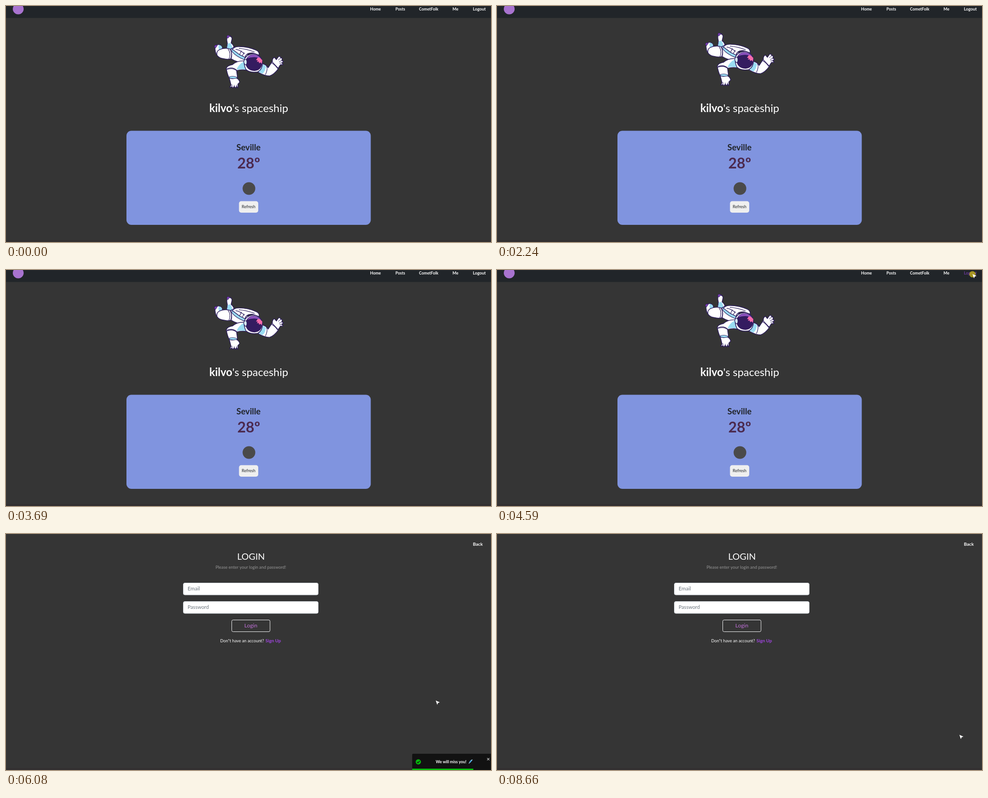
Write an HTML page with a canvas that moves like this. It is 1071 px wide and 523 px high and loops after 8.79 s.

```html
<!DOCTYPE html>
<html lang="en">
<head>
<meta charset="utf-8">
<title>Spaceship</title>
<style>
  html, body { margin: 0; width: 100%; height: 100%; overflow: hidden; background: #353535; }
  canvas { display: block; }
</style>
</head>
<body>
<canvas id="stage" width="1071" height="523"></canvas>
<script>
const ctx = document.getElementById('stage').getContext('2d');
const LOOP = 8790, LOGOUT = 4650;
const INK = '#2a1a5c', WHITE = '#fff', SKY = '#9adcf2', PURPLE = '#7a3fb0', GREEN = '#07bc0c';

function text(str, x, y, size, color = WHITE, weight = 400, align = 'left') {
  ctx.font = `${weight} ${size}px Lato, "Open Sans", sans-serif`;
  ctx.textAlign = align;
  ctx.fillStyle = color;
  ctx.fillText(str, x, y);
  return ctx.measureText(str).width;
}

function rect(x, y, w, h, color) {
  ctx.fillStyle = color;
  ctx.fillRect(x, y, w, h);
}

function box(x, y, w, h, r, fill, stroke) {
  ctx.beginPath();
  ctx.roundRect(x, y, w, h, r);
  if (fill) { ctx.fillStyle = fill; ctx.fill(); }
  if (stroke) { ctx.strokeStyle = stroke; ctx.lineWidth = 1; ctx.stroke(); }
}

function disc(x, y, r, color) {
  ctx.beginPath();
  ctx.arc(x, y, r, 0, Math.PI * 2);
  ctx.fillStyle = color;
  ctx.fill();
}

// Astronaut parts, painted back to front: [path, fill, line width]
const astronaut = [
  // raised leg
  ['M487 97L489 83Q487 76 488 70Q490 65 494 67Q499 68 499 73L497 82Q506 89 502 97L494 103Z', WHITE, 1.4],
  ['M487.5 97L489.5 84Q493 81 496 83Q499 87 500 93L494 102Z', SKY],
  ['M488 71Q487 64 491 65L497 67Q492 67 491 71Z', PURPLE, .8],
  // bent leg
  ['M464 106Q460 95 463 88Q468 84 474 87L478 92Q478 96 472 99L467 108Z', WHITE, 1.4],
  ['M470 86.5Q478 87 477 94L471 98Q468 92 470 86.5Z', SKY],
  ['M460 91Q460 85 467 87L463 93Z', PURPLE, .8],
  ['M466 109Q464 101 471 97Q482 92 494 95Q501 104 497 117Q490 119 482 117Q470 116 466 109Z', WHITE, 1.4],
  // torso
  ['M495 96L503 92L534 108L528 127Q510 125 497 117Q501 106 495 96Z', WHITE, 1.4],
  ['M498 94Q506 90 512 96L531 108L526 119Q508 112 499 101Z', SKY, 1.1],
  ['M490 95Q498 105 492 118M495 95Q501 105 496 117', null, 1.1],
  // backpack
  ['M500 96Q504 90 514 90Q535 90 552 98Q560 101 559 109L545 104Q530 103 528 114L516 108Z', WHITE, 1.4],
  ['M507 96Q516 97 527 106M514 94Q530 95 549 102M520 99L516 107M526 103L522 110', null, 1.2],
  // lower arm with hand
  ['M528 122Q512 120 500 130Q485 133 487 141L510 143Q520 140 531 142Z', WHITE, 1.4],
  ['M525 123Q513 130 509 141Q520 139 531 141L528 126Z', SKY],
  ['M493 159L497 175L494 181L499 179L501 182L504 178L507 182L509 178L512 182L512 173L516 169Q515 163 509 160Z', WHITE, 1.4],
  ['M499 174L499 180M504 175L504 180M509 175L509 180', null, 1],
  ['M487 141Q489 152 493 160Q502 163 511 158L509 143Q500 136 487 141Z', WHITE, 1.4],
  ['M493 157Q502 154 510 158L510 160Q502 162 494 160Z', SKY, .9],
  ['M488 139Q501 134 510 143', null, 1.1],
  // outstretched arm with hand
  ['M557 147L566 128Q574 129 579 137L588 123L602 138Q592 152 582 155Q571 155 557 147Z', WHITE, 1.4],
  ['M558 146L566 129Q573 131 574 135Q572 146 566 150Z', SKY],
  ['M575 133Q579 139 573 152M586 126Q594 130 600 139', null, 1.2],
  ['M588 124Q588 115 593 114L597 119L602 112Q607 111 606 115L610 116L609 121L613 123L609 126L612 130L606 130L601 138Z', WHITE, 1.4],
  ['M601 120L606 116M603 124L609 121M604 127L609 126', null, 1],
  // helmet
  ['M526 120Q530 107 547 105.5Q565 109 566.5 126Q566 141 556 146Q540 149 530 141Q525 131 526 120Z', WHITE, 1.5],
  ['M528.5 125Q530 109 547 107.5Q565 110 566 126Q565 142 549 144Q530 143 528.5 125Z', '#341c60'],
  ['M531 117Q538 106.5 549 107.5Q560 110 564 118Q550 110 531 117Z', '#8b50bd', .7],
  ['M552 120L556 114L561 115L566 120L565 128L562 125L559 127L558 123L554 124L556 120Z', '#f66bab'],
  ['M527 118.5Q532 117.5 532 124.5Q532 130.5 528 130.5Q525 126 525 123Z', '#d8f2fb', 1.1],
].map(([d, fill, line]) => ({ path: new Path2D(d), fill, line }));

function drawAstronaut(t) {
  const lift = 5.8 * (1 + Math.cos((t - 1435) / 3000 * Math.PI * 2));
  ctx.save();
  ctx.translate(0, -lift);
  ctx.strokeStyle = INK;
  ctx.lineJoin = 'round';
  for (const { path, fill, line } of astronaut) {
    if (fill) { ctx.fillStyle = fill; ctx.fill(path); }
    if (line) { ctx.lineWidth = line; ctx.stroke(path); }
  }
  ctx.restore();
}

// Pointer stops: [time, x, y]
const trips = [
  [[400, 1042, 523], [650, 980, 410], [930, 880, 296], [970, 865, 281], [1250, 734, 218],
   [1600, 630, 222], [1840, 598, 226], [2240, 572, 226], [2500, 577, 227], [2770, 604, 228],
   [2950, 655, 231], [3300, 850, 110], [3600, 958, 12], [3680, 975, -20]],
  [[4150, 1020, -14], [4350, 1050, 9], [4800, 1050, 9], [5000, 1043, 60], [5200, 1015, 165],
   [5400, 990, 240], [5560, 966, 305], [5690, 957, 324], [6080, 949, 369], [6400, 943, 393],
   [6600, 944, 398], [7000, 975, 426], [7500, 1021, 445], [LOOP, 1021, 445]],
];

function pointerAt(t) {
  const stops = trips.find(s => t >= s[0][0] && t < s[s.length - 1][0]);
  if (!stops) return null;
  const i = stops.findIndex(s => s[0] > t);
  const [t0, x0, y0] = stops[i - 1], [t1, x1, y1] = stops[i];
  const p = (t - t0) / (t1 - t0);
  return { x: x0 + (x1 - x0) * p, y: y0 + (y1 - y0) * p };
}

const arrow = new Path2D('M0 0L9 4L5 5.5L3.3 9.5Z');
const caret = new Path2D('M-1.5 -6.5H1.5M0 -6.5V5.5M-1.5 5.5H1.5');

function drawPointer({ x, y }, overText) {
  ctx.save();
  ctx.translate(x, y);
  if (overText) {
    ctx.strokeStyle = '#ddd';
    ctx.lineWidth = 1;
    ctx.stroke(caret);
  } else {
    ctx.fillStyle = WHITE;
    ctx.fill(arrow);
  }
  ctx.restore();
}

function drawHome(t, hover) {
  rect(0, 0, 1071, 26.5, '#212529');
  disc(27, 6.5, 12, '#a873cf');
  const links = [['Home', 804], ['Posts', 860], ['CometFolk', 912], ['Me', 986]];
  for (const [label, x] of links) text(label, x, 9.5, 8.8, WHITE, 700);
  text('Logout', 1031, 9.5, 9.2, hover ? '#6c3a9c' : WHITE, 700);

  drawAstronaut(t);
  const w = text('kilvo', 449, 235, 23.9, WHITE, 700);
  text("'s spaceship", 449 + w, 235, 23.9);

  box(266, 276.5, 539.5, 208.5, 11, '#8094df');
  text('Seville', 535.5, 320, 18.6, '#212529', 700, 'center');
  text('28º', 536, 360, 32.5, '#4b2a4f', 700, 'center');
  disc(536.5, 404.5, 14, '#4a4a4a');
  box(514.5, 432.5, 42.5, 25.5, 5, '#efefef');
  text('Refresh', 535.7, 448, 9.1, '#212529', 400, 'center');
}

function drawLogin() {
  text('Back', 1031, 26, 10, WHITE, 700);
  text('LOGIN', 541, 57, 20, WHITE, 400, 'center');
  text('Please enter your login and password!', 540.5, 76.5, 9.4, '#969696', 400, 'center');
  box(391.5, 108.5, 298, 26.5, 3.5, WHITE, '#ced4da');
  box(391.5, 149.5, 298, 26.5, 3.5, WHITE, '#ced4da');
  text('Email', 401, 125, 11.6, '#6c757d');
  text('Password', 401, 166, 11.2, '#6c757d');
  box(498.5, 190.5, 84.5, 26, 3, null, '#f8f9fa');
  text('Login', 540.7, 207, 12.2, '#c070d8', 400, 'center');
  text('Don"t have an account?', 473, 240, 9.3);
  text('Sign Up', 573, 240, 10, '#a045e0', 700);
}

const easeOut = p => 1 - (1 - p) ** 3;

// Sideways shift of the toast over its entry and exit
function slide(p, stops, ease) {
  const i = Math.max(1, stops.findIndex(s => s[0] >= p));
  const [p0, a] = stops[i - 1], [p1, b] = stops[i];
  return a + (b - a) * ease((p - p0) / (p1 - p0));
}
const ENTER = [[0, 1632], [.6, -13.6], [.75, 5.4], [.9, -2.7], [1, 0]];
const LEAVE = [[0, 0], [.2, -10.9], [1, 1088]];

function drawToast(t) {
  const start = 4708, ready = 5408, close = 8408;
  if (t < start) return;
  let dx = 0, alpha = 1;
  if (t < ready) {
    dx = slide((t - start) / 700, ENTER, easeOut);
    alpha = Math.min(1, (t - start) / 420);
  } else if (t > close) {
    dx = slide((t - close) / 700, LEAVE, p => 1 - (1 - p) ** 2);
  }
  if (dx > 180) return;
  ctx.save();
  ctx.globalAlpha = alpha;
  ctx.translate(897 + dx, 487);
  box(0, 0, 190, 40, 2, '#121212');
  disc(13.5, 18, 5.8, GREEN);
  ctx.lineWidth = 1.5;
  ctx.strokeStyle = '#121212';
  ctx.stroke(new Path2D('M10.5 18L12.8 20.3L16.7 15.8'));
  text('We will miss you!', 52, 20.5, 8.8, WHITE, 700);
  ctx.lineWidth = 3;
  ctx.strokeStyle = '#3f9fd8';
  ctx.stroke(new Path2D('M127 19L131.5 14'));
  ctx.lineWidth = 1.6;
  ctx.strokeStyle = '#9cc7dc';
  ctx.stroke(new Path2D('M125 21.5L128 18.5M130 15.5L133 13'));
  ctx.lineWidth = 1.1;
  ctx.strokeStyle = '#c4c4c4';
  ctx.stroke(new Path2D('M165.5 9.5L170.5 14.5M170.5 9.5L165.5 14.5'));
  const left = 1 - Math.min(1, Math.max(0, (t - ready) / (close - ready)));
  rect(0, 33, 174 * left, 3, GREEN);
  ctx.restore();
}

function draw(t) {
  rect(0, 0, 1071, 523, '#353535');
  rect(0, 519, 1071, 4, '#322f30');
  const home = t < LOGOUT;
  const pointer = pointerAt(t);
  if (home) {
    drawHome(t, pointer && pointer.x > 1031 && pointer.y > 0 && pointer.y < 14);
    if (t > 4540) disc(1050, 9.5, 7, 'rgba(190, 172, 25, .82)');
  } else {
    drawLogin();
    drawToast(t);
  }
  if (pointer) {
    const overText = home && pointer.x > 449 && pointer.x < 623 && pointer.y > 214 && pointer.y < 240;
    drawPointer(pointer, overText);
  }
}

const begin = performance.now();
function tick() {
  draw((performance.now() - begin) % LOOP);
  requestAnimationFrame(tick);
}
tick();
</script>
</body>
</html>
```
